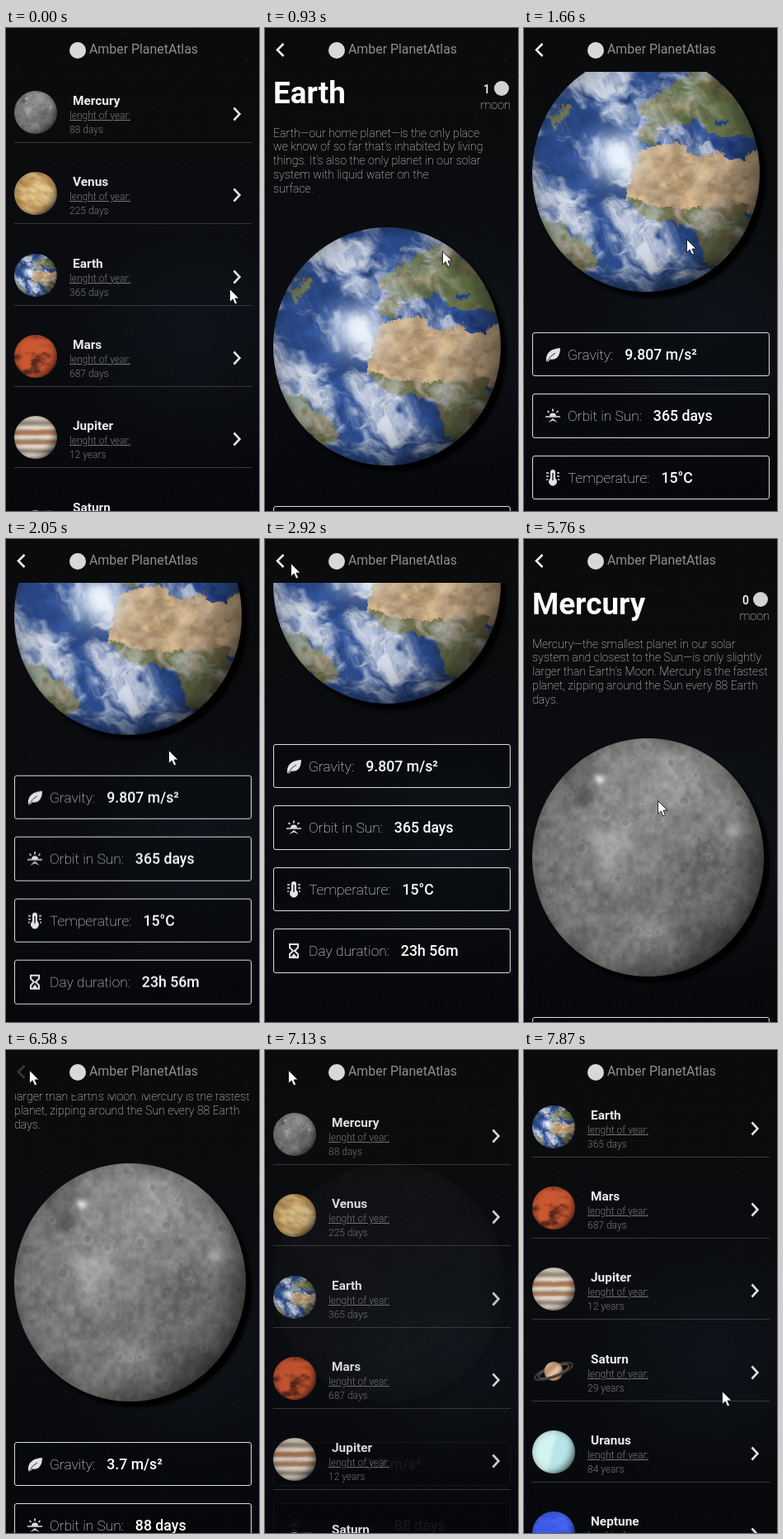
Recreate the animation shown at these times as an HTML page with a canvas. Size 307 px wide and 584 px high, loop 8000 ms.

```html
<!DOCTYPE html>
<html lang="en">
<head>
<meta charset="utf-8">
<title>Amber PlanetAtlas</title>
<style>
html, body { margin: 0; width: 100%; height: 100%; overflow: hidden; background: #0a0b0e; }
body { position: relative; color: #fff; font-family: Roboto, "Open Sans", sans-serif; }
#sky, .view, .scroll, .abs { position: absolute; left: 0; top: 0; }
.abs { white-space: nowrap; line-height: 20px; }
.view { top: 53px; width: 307px; height: 531px; overflow: hidden; }
.scroll { top: -53px; width: 307px; height: 900px; }
.app { left: 101px; top: 16px; font-size: 15.9px; color: #8d8e90; }
.dot { left: 77px; top: 17px; width: 20px; height: 20px; border-radius: 50%; background: #d8d8da; }
svg { fill: none; }
.row { position: absolute; left: 10px; width: 288px; height: 98.3px; }
.row canvas { position: absolute; left: 0; top: 10px; width: 52px; height: 52px; }
.row hr { position: absolute; margin: 0; left: 0; top: 72px; width: 288px; height: 1px; border: 0; background: #37393c; }
.name { left: 71px; top: 12px; font-size: 15.4px; font-weight: 700; color: #ececee; }
.year { left: 67px; top: 32px; font-size: 12px; font-weight: 300; color: #77787b; line-height: 17px; }
.year u { text-underline-offset: 1px; }
.title { left: 10px; top: 69px; font-size: 36.8px; font-weight: 700; }
.count { left: 265px; top: 64px; font-size: 14px; font-weight: 500; }
.moon { left: 278px; top: 64px; width: 18px; height: 18px; border-radius: 50%; background: #d0d3d1; }
.unit { left: auto; right: 9px; top: 84px; font-size: 14.4px; font-weight: 100; color: #f0f0f2; }
.about { left: 10px; top: 118.7px; font-size: 14.1px; font-weight: 100; line-height: 16.75px; color: #f0f0f2; }
.globe { position: absolute; left: 10px; top: 241px; width: 288px; height: 288px; filter: drop-shadow(7px 7px 2px #000); }
.box { position: absolute; left: 10px; width: 286px; height: 51.45px; border: 1px solid #dcdcde; border-radius: 3px; background: #07080a66; }
.box svg { position: absolute; left: 14px; top: 16px; }
.box .abs { top: 16px; left: 42px; font-size: 17.4px; }
.label { font-weight: 100; color: #fff; }
.box b { margin-left: 14px; font-size: 17.7px; font-weight: 500; color: #fff; }
#list, #earth, #mercury, .scroll, #back, #cursor { animation: 8s linear infinite; }
#list { animation-name: list; }
#list .scroll { animation-name: listScroll; }
#earth { animation-name: earth; }
#earth .scroll { animation-name: earthScroll; }
#mercury { animation-name: mercury; }
#mercury .scroll { animation-name: mercuryScroll; }
#back { animation-name: back; }
#cursor { animation-name: cursor; animation-timing-function: ease-in-out; }
@keyframes list {
  0%, 1.9% { opacity: 1 } 8%, 39.5% { opacity: 0 } 46%, 57% { opacity: 1 }
  63.5%, 83% { opacity: 0 } 89.5%, 100% { opacity: 1 }
}
@keyframes earth { 0%, 1.9% { opacity: 0 } 8%, 39.5% { opacity: 1 } 46%, 100% { opacity: 0 } }
@keyframes mercury { 0%, 57% { opacity: 0 } 63.5%, 83% { opacity: 1 } 89.5%, 100% { opacity: 0 } }
@keyframes listScroll { 0%, 95% { transform: none } 98.3%, 100% { transform: translateY(-206px) } }
@keyframes earthScroll {
  0%, 14.5% { transform: none } 20.7%, 22% { transform: translateY(-210px) }
  27.3%, 100% { transform: translateY(-330px) }
}
@keyframes mercuryScroll { 0%, 73.5% { transform: none } 76.4%, 100% { transform: translateY(-104px) } }
@keyframes back {
  0%, 1.9% { opacity: 0 } 8%, 37.9% { opacity: 1 } 38%, 39.5% { opacity: .2 } 46%, 57% { opacity: 0 }
  63.5%, 82.2% { opacity: 1 } 82.24%, 83% { opacity: .2 } 89.5%, 100% { opacity: 0 }
}
@keyframes cursor {
  0%, 6.3% { transform: translate(271px, 315px) }
  14.4%, 29.4% { transform: translate(197px, 255px) }
  36.3%, 43.2% { transform: translate(31px, 29px) }
  54.5%, 61% { transform: translate(274px, 107px) }
  71.8%, 73.5% { transform: translate(162px, 316px) }
  77.2%, 94.5% { transform: translate(28px, 24px) }
  98.2%, 100% { transform: translate(240px, 412px) }
}
</style>
</head>
<body>
<canvas id="sky" width="307" height="584"></canvas>
<div class="view" id="list"><div class="scroll"></div></div>
<div class="view" id="earth"><div class="scroll"></div></div>
<div class="view" id="mercury"><div class="scroll"></div></div>
<div class="abs dot"></div>
<div class="abs app">Amber PlanetAtlas</div>
<svg class="abs" id="back" width="40" height="53"><path d="M22.5 19 15 26.5 22.5 34" stroke="#e8e8ea" stroke-width="2.6"/></svg>
<svg class="abs" id="cursor" width="16" height="22"><path d="M.5 .5V16.5L4.2 13 6.8 19 9.6 17.8 7 12H12Z" fill="#fff" stroke="#111" stroke-width=".9"/></svg>
<script>
const $ = s => document.querySelector(s);
const clamp = (v, a = 0, b = 1) => Math.min(b, Math.max(a, v));
const step = (a, b, v) => { const t = clamp((v - a) / (b - a)); return t * t * (3 - 2 * t); };
const mix = (a, b, t) => a.map((v, i) => v + (b[i] - v) * t);
const hash = (x, y) => { const h = Math.sin(x * 127.1 + y * 311.7) * 43758.5453; return h - Math.floor(h); };

function noise(x, y) {
  const i = Math.floor(x), j = Math.floor(y), u = step(0, 1, x - i), v = step(0, 1, y - j);
  const top = hash(i, j) * (1 - u) + hash(i + 1, j) * u;
  const low = hash(i, j + 1) * (1 - u) + hash(i + 1, j + 1) * u;
  return top * (1 - v) + low * v;
}
function fbm(x, y, n = 5) {
  let sum = 0, amp = .5, total = 0;
  for (; n--; amp *= .55, x = x * 2 + 7.3, y = y * 2 + 3.1) { sum += amp * noise(x, y); total += amp; }
  return sum / total;
}
const spot = (x, y, cx, cy, r) => Math.exp(-((x - cx) ** 2 + (y - cy) ** 2) / (r * r));

function canvas(w, h = w) {
  const c = document.createElement('canvas');
  c.width = w; c.height = h;
  return c;
}

// Shades a disc; color(x, y) works on a 288 unit square.
function globe(size, color, rx = 144, dark = .2) {
  const c = canvas(size), g = c.getContext('2d'), img = g.createImageData(size, size), k = 288 / size;
  for (let j = 0; j < size; j++) for (let i = 0; i < size; i++) {
    const x = (i + .5) * k, y = (j + .5) * k, nx = (x - rx) / rx, ny = (y - 144) / 144;
    const r = Math.hypot(nx, ny);
    if (r > 1.01) continue;
    const light = 1 - dark * r ** 8 - .45 * step(.5, 1.25, r * .55 + (nx + ny * .7) * .45);
    const rgb = color(x, y), p = (j * size + i) * 4;
    for (let n = 0; n < 3; n++) img.data[p + n] = clamp(rgb[n] * light, 0, 255);
    img.data[p + 3] = 255 * clamp((1 - r) * 144 / k + .5);
  }
  g.putImageData(img, 0, 0);
  return c;
}

const craters = Array.from({ length: 80 }, (_, i) => [hash(i, 1) * 288, hash(i, 2) * 288, 1.5 + 5 * hash(i, 3) ** 3]);
function mercury(x, y) {
  let v = 92 + 70 * fbm(x / 50, y / 50, 6) + 42 * (fbm(x / 7, y / 8, 3) - .5);
  v += 95 * spot(x, y, 82, 50, 6) + 32 * spot(x, y, 92, 130, 26) + 45 * spot(x, y, 245, 112, 8);
  v += 22 * spot(x, y, 160, 45, 30) - 32 * spot(x, y, 62, 72, 10) + 20 * spot(x, y, 142, 235, 16);
  v -= 12 * spot(x, y, 190, 190, 50);
  for (const [cx, cy, r] of craters) {
    const d = Math.hypot(x - cx, y - cy) / r;
    if (d < 1.4) v += 12 * Math.exp(-(((d - 1) * 4) ** 2)) - 6 * (d < .9);
  }
  return [v, v, v * .99];
}

const lands = [
  ['#5f6b45', [130,65, 158,45, 175,30, 215,20, 252,55, 277,100, 252,98, 230,100, 195,78, 180,90, 152,90, 150,110, 130,113, 127,93, 142,86]],
  ['#cdb08a', [130,120, 155,111, 182,108, 188,118, 205,123, 230,118, 250,128, 285,110, 285,160, 275,190, 230,195, 180,192, 140,185, 118,180, 113,165, 118,145]],
  ['#6b704a', [118,178, 180,188, 262,180, 265,212, 248,242, 235,262, 212,257, 205,232, 195,212, 180,206, 140,202]],
  ['#66754f', [10,200, 35,205, 52,220, 78,235, 76,255, 60,262, 28,245]],
  ['#71805c', [22,78, 40,62, 46,70, 26,92]]
];
const seas = ['M152 98 172 99 190 109 226 108', 'M236 108 258 130', 'M222 80 240 86', 'M180 88 198 104'];
function earthMap() {
  const g = canvas(288).getContext('2d', { willReadFrequently: true });
  g.fillStyle = '#2c4c8e';
  g.fillRect(0, 0, 288, 288);
  for (const [fill, p] of lands) {
    g.beginPath();
    for (let i = 0; i < p.length; i += 2) g.lineTo(p[i], p[i + 1]);
    g.fillStyle = fill;
    g.fill();
  }
  g.strokeStyle = '#233f85';
  seas.forEach((d, i) => { g.lineWidth = i ? 5 : 12; g.stroke(new Path2D(d)); });
  return g.getImageData(0, 0, 288, 288).data;
}
const map = earthMap();
function earth(x, y) {
  const jitter = (hash(x, y) - .5) * 3;
  const wx = (fbm(x / 12, y / 12, 4) - .5) * 18 + jitter, wy = (fbm(x / 12 + 40, y / 12, 4) - .5) * 18 + jitter;
  const p = (clamp(Math.round(y + wy), 0, 287) * 288 + clamp(Math.round(x + wx), 0, 287)) * 4;
  let rgb = [map[p], map[p + 1], map[p + 2]];
  const sand = rgb[0] > 160, land = rgb[0] > 80;
  if (land) rgb = mix(rgb, [150, 122, 88], step(.45, .75, fbm(x / 22 + 9, y / 16)) * .7);
  const shade = .72 + .5 * fbm(x / 16, y / 16);
  rgb = rgb.map(v => v * shade);
  const warp = fbm(x / 50 + 3, y / 50, 4) * 2.4;
  const cloud = fbm((x + y * .8) / 46 + warp, (y - x * .6) / 27 + warp, 6)
    + .09 * spot(x, y, 40, 70, 60) + .06 * spot(x, y, 90, 220, 80) + .08 * spot(x, y, 230, 200, 30);
  rgb = mix(rgb, [222, 228, 238], step(.42, .82, cloud) * (sand ? .12 : land ? .6 : .95));
  return mix(rgb, [238, 246, 255], .92 * spot(x, y, 103, 125, 29));
}

const venus = (x, y) => mix([176, 132, 72], [232, 205, 148], step(.15, .85, fbm((x + y) / 130, (y - x * .5) / 45)));
const mars = (x, y) => mix([92, 42, 28], [204, 88, 50], step(.28, .62, fbm(x / 70 + 5, y / 50) + .08 * spot(x, y, 130, 90, 70)));
function jupiter(x, y) {
  const v = y + 14 * (fbm(x / 50, y / 14) - .5);
  let rgb = mix([150, 138, 128], [226, 214, 198], .5 + .5 * Math.sin(v / 10));
  rgb = mix(rgb, [184, 112, 66], .85 * Math.exp(-(((v - 112) / 14) ** 2)));
  return mix(rgb, [178, 118, 78], .8 * Math.exp(-(((v - 178) / 13) ** 2)));
}
const uranus = (x, y) => mix([184, 230, 232], [210, 244, 243], step(190, 150, x + y * .25));
const neptune = (x, y) => mix([48, 76, 222], [82, 112, 250], fbm(x / 110, y / 35, 3));

function saturn() {
  const c = canvas(104), g = c.getContext('2d');
  const ring = (a, b) => {
    g.lineWidth = 5;
    g.strokeStyle = '#3d3934';
    g.beginPath(); g.ellipse(0, 0, 48, 13, 0, a, b); g.stroke();
    g.lineWidth = 3;
    g.strokeStyle = '#5e554b';
    g.beginPath(); g.ellipse(0, 0, 39, 10, 0, a, b); g.stroke();
  };
  const ball = globe(46, (x, y) => mix([190, 145, 108], [226, 194, 160], .5 + .5 * Math.sin((y + x * .4) / 28)));
  g.translate(52, 53); g.rotate(-.36);
  ring(Math.PI, 2 * Math.PI);
  g.drawImage(ball, -23, -23);
  ring(0, Math.PI);
  return c;
}

const chevron = '<svg class="abs" style="left:260px;top:26px" width="20" height="24"><path d="M6.5 4.5 13.5 12 6.5 19.5" stroke="#dedee0" stroke-width="2.6"/></svg>';
const rows = [
  ['Mercury', '88 days', mercury], ['Venus', '225 days', venus], ['Earth', '365 days', earth], ['Mars', '687 days', mars],
  ['Jupiter', '12 years', jupiter], ['Saturn', '29 years'], ['Uranus', '84 years', uranus], ['Neptune', '165 years', neptune]
];
rows.forEach(([name, year, color], i) => {
  const row = document.createElement('div');
  row.className = 'row';
  row.style.top = 66 + i * 98.3 + 'px';
  row.innerHTML = `<div class="abs name">${name}</div><div class="abs year"><u>lenght of year:</u><br>${year}</div>${chevron}<hr>`;
  row.prepend(color ? globe(104, color) : saturn());
  $('#list .scroll').append(row);
});

const icons = [
  '<path fill="#e2e2e4" d="M2 18C1 8 7 3 19 2 19 13 13 17 7 15.500L4 18.500Z"/><path d="M3 18Q8 10 13 8" stroke="#0a0b0e" stroke-width=".8"/>',
  '<path fill="#e2e2e4" d="M6 10.500a4 4 0 0 1 8 0ZM4 18 10 13 16 18 10 15.500Z"/><path d="M1 11H19M10 1.500V4.500M3.500 4 5.500 6M16.500 4 14.500 6" stroke="#e2e2e4" stroke-width="1.700"/>',
  '<path fill="#e2e2e4" d="M7 3a3 3 0 0 1 6 0V10.500a5 5 0 1 1-6 0Z"/><path d="M2 4H5M2 8H5M2 12H4M15 4H18M15 8H18M16 12H18" stroke="#e2e2e4" stroke-width="1.700"/><path d="M10 4V13" stroke="#0a0b0e" stroke-width="1.300"/>',
  '<path d="M5 2H15V6L11 10 15 14V18H5V14L9 10 5 6Z" stroke="#e2e2e4" stroke-width="2"/><path d="M7 17 10 13 13 17Z" fill="#e2e2e4"/>'
];
const labels = ['Gravity:', 'Orbit in Sun:', 'Temperature:', 'Day duration:'];
function detail(id, title, moons, lines, facts, color, rx) {
  const page = $(id + ' .scroll');
  page.innerHTML = `<div class="abs title">${title}</div><div class="abs count">${moons}</div><div class="abs moon"></div>
    <div class="abs unit">moon</div><div class="abs about">${lines.join('<br>')}</div>` +
    facts.map((fact, i) => `<div class="box" style="top:${578 + i * 74.45}px"><svg width="20" height="20">${icons[i]}</svg>
      <div class="abs"><span class="label">${labels[i]}</span><b>${fact}</b></div></div>`).join('');
  const ball = globe(288, color, rx);
  ball.className = 'globe';
  page.append(ball);
}
detail('#earth', 'Earth', 1, [
  'Earth—our home planet—is the only place', 'we know of so far that’s inhabited by living',
  'things. It’s also the only planet in our solar', 'system with liquid water on the', 'surface.'
], ['9.807 m/s²', '365 days', '15°C', '23h 56m'], earth, 138);
detail('#mercury', 'Mercury', 0, [
  'Mercury—the smallest planet in our solar', 'system and closest to the Sun—is only slightly',
  'larger than Earth’s Moon. Mercury is the fastest', 'planet, zipping around the Sun every 88 Earth', 'days.'
], ['3.7 m/s²', '88 days'], mercury, 140.5);

function sky() {
  const g = $('#sky').getContext('2d');
  const base = g.createLinearGradient(0, 0, 0, 584);
  base.addColorStop(0, '#0a0b0c');
  base.addColorStop(.6, '#0a0c10');
  base.addColorStop(1, '#07080b');
  g.fillStyle = base;
  g.fillRect(0, 0, 307, 584);
  const haze = g.createRadialGradient(230, 370, 0, 230, 370, 170);
  haze.addColorStop(0, '#1a222c55');
  haze.addColorStop(1, '#1a222c00');
  g.fillStyle = haze;
  g.fillRect(0, 0, 307, 584);
  for (let i = 0; i < 420; i++) {
    g.fillStyle = `rgba(150,170,190,${.03 + .16 * hash(i, 9) ** 3})`;
    g.fillRect(hash(i, 5) * 307, hash(i, 6) * 584, 1, 1);
  }
}
sky();
</script>
</body>
</html>
```
